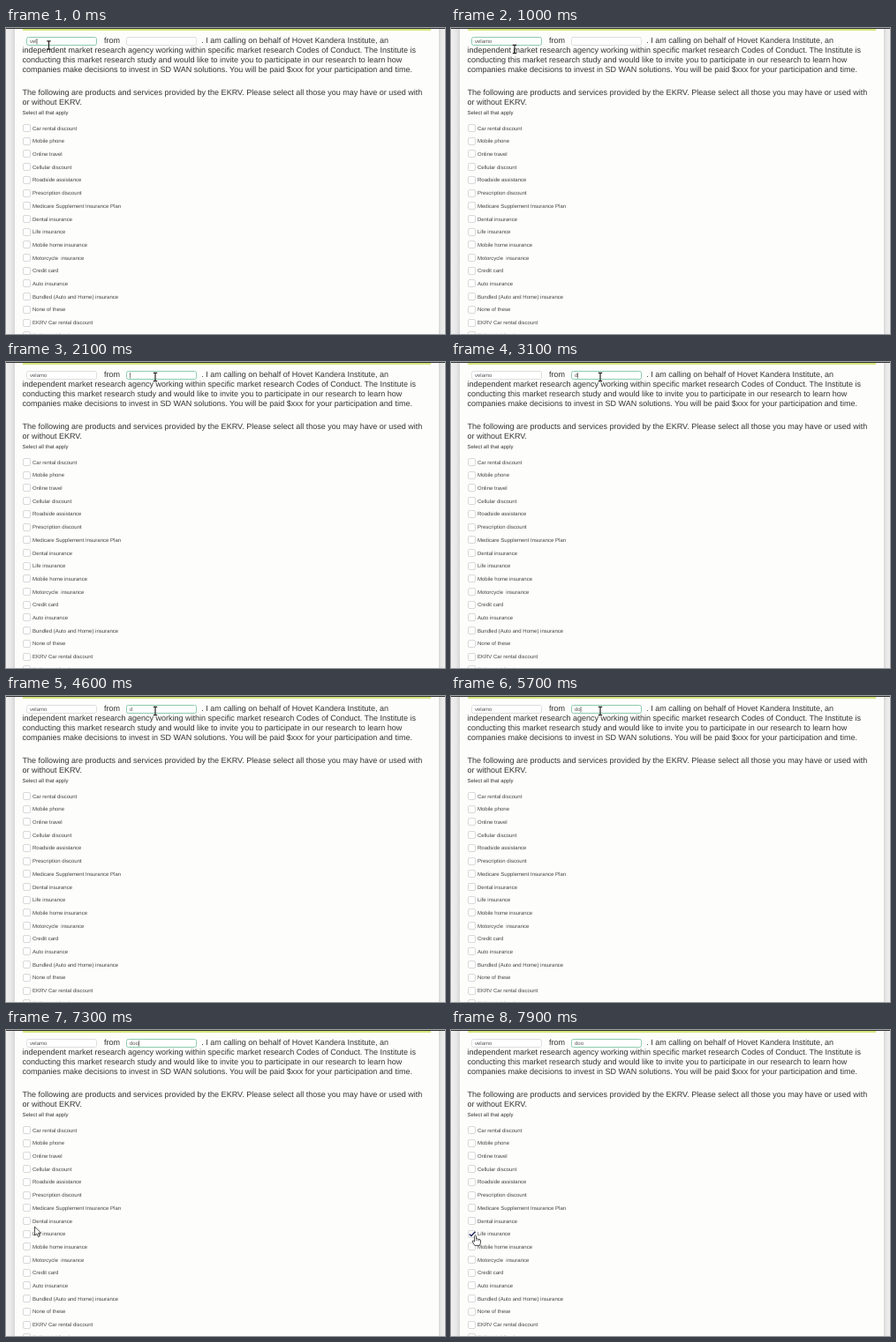
Animation, 497 px wide and 347 px high, one loop 8000 ms. Source, as an HTML page with a canvas:

```html
<!DOCTYPE html>
<html lang="en">
<head>
<meta charset="utf-8">
<title>Survey form</title>
<style>
  html, body { margin: 0; width: 100%; height: 100%; overflow: hidden; background: #fdfdfc; }
  canvas { display: block; }
</style>
</head>
<body>
<canvas id="stage" width="497" height="347"></canvas>
<script>
const ctx = document.getElementById('stage').getContext('2d');
const LOOP = 8000;
const FONT = '"Liberation Sans", Arial, sans-serif';
const ROW_TOP = 113.5, ROW_STEP = 14.7;
const PERSON = 'velamo', COMPANY = 'doo';
const CHECKED_ROW = 8;

const paragraphs = [
  [111, 17.2, 'from'],
  [221.3, 17.2, '. I am calling on behalf of Hovet Kandera Institute, an'],
  [18.5, 28.2, 'independent market research agency working within specific market research Codes of Conduct. The Institute is'],
  [18.5, 39.2, 'conducting this market research study and would like to invite you to participate in our research to learn how'],
  [18.5, 50.2, 'companies make decisions to invest in SD WAN solutions. You will be paid $xxx for your participation and time.'],
  [18.5, 76.2, 'The following are products and services provided by the EKRV. Please select all those you may have or used with'],
  [18.5, 87.2, 'or without EKRV.']
];

const options = [
  'Car rental discount', 'Mobile phone', 'Online travel', 'Cellular discount',
  'Roadside assistance', 'Prescription discount', 'Medicare Supplement Insurance Plan',
  'Dental insurance', 'Life insurance', 'Mobile home insurance', 'Motorcycle\u00a0 insurance',
  'Credit card', 'Auto insurance', 'Bundled (Auto and Home) insurance', 'None of these',
  'EKRV Car rental discount', 'EKRV Mobile phone'
];

// Each track is a list of [start time, value]; values hold until the next entry.
const tracks = {
  personLength: [[0, 3], [200, 4], [400, 5], [500, 6]],
  companyLength: [[0, 0], [3100, 1], [5700, 2], [6300, 3]],
  field: [[0, 0], [2100, 1]],
  caret: [[0, 1], [1000, 0], [1500, 1], [2600, 0], [3100, 1], [3700, 0], [4200, 1],
          [4600, 0], [5300, 1], [6800, 0], [7300, 1], [7900, 0]],
  spelling: [[0, 0], [1600, 1], [2100, 0]],
  checked: [[0, 0], [7500, 1]],
  pointer: [
    [0, ['beam', 48.5, 19.5]], [1000, ['beam', 72, 24]], [1100, ['beam', 99, 24]],
    [1500, ['beam', 146, 20]], [1600, ['beam', 168, 17]], [2100, ['beam', 169, 17]],
    [6800, ['arrow', 41.5, 217.5]], [7000, ['arrow', 38.5, 218.5]],
    [7300, ['arrow', 32.5, 223]], [7400, ['hand', 28, 228]], [7500, ['hand', 27, 228]],
    [7900, ['hand', 27.5, 233]]
  ]
};

function at(track, time) {
  let value;
  for (const [start, v] of track) if (time >= start) value = v;
  return value;
}

function text(str, x, y, size, color) {
  ctx.font = `${size}px ${FONT}`;
  ctx.fillStyle = color;
  ctx.fillText(str, x, y);
}

function roundBox(x, y, w, h, r, stroke) {
  ctx.beginPath();
  ctx.roundRect(x, y, w, h, r);
  ctx.fillStyle = '#fff';
  ctx.fill();
  ctx.strokeStyle = stroke;
  ctx.lineWidth = 1;
  ctx.stroke();
}

function edge(from, to) {
  const g = ctx.createLinearGradient(from, 0, to, 0);
  g.addColorStop(0, '#efefef');
  g.addColorStop(0.6, '#e8e8e8');
  g.addColorStop(1, '#d6d6d6');
  ctx.fillStyle = g;
  ctx.fillRect(Math.min(from, to), 0, Math.abs(to - from), 347);
}

function drawPage() {
  ctx.fillStyle = '#fdfdfc';
  ctx.fillRect(0, 0, 497, 347);
  edge(0, 10);
  edge(497, 490);
  ctx.fillStyle = '#d5e77b';
  ctx.fillRect(19, 1, 462, 2);
  ctx.fillStyle = '#333';
  ctx.fillRect(0, 0, 497, 1);
  for (const [x, y, str] of paragraphs) text(str, x, y, 9, '#333');
  text('Select all that apply', 18.5, 97.6, 6, '#333');
}

function drawOptions(checked) {
  options.forEach((label, i) => {
    const y = ROW_TOP + i * ROW_STEP;
    roundBox(19.5, Math.round(y - 4.5) + 0.5, 8, 8, 1.5, '#d9d9d9');
    text(label, 30, y + 2.1, 6, '#444');
  });
  if (!checked) return;
  const y = ROW_TOP + CHECKED_ROW * ROW_STEP;
  ctx.beginPath();
  ctx.moveTo(20.8, y + 0.3);
  ctx.lineTo(23, y + 2.4);
  ctx.lineTo(27.4, y - 2.3);
  ctx.strokeStyle = '#20265c';
  ctx.lineWidth = 1.4;
  ctx.stroke();
}

function drawField(x, value, active, caret, spelling) {
  roundBox(x + 0.5, 10.5, 79, 9, 2, active ? '#8ccbb0' : '#dedede');
  text(value, x + 4, 17.4, 6, '#555');
  const width = ctx.measureText(value).width;
  if (spelling) {
    ctx.fillStyle = '#9aa9ad';
    ctx.fillRect(x + 4, 18, width, 0.8);
  }
  if (active && caret) {
    ctx.fillStyle = '#444';
    ctx.fillRect(x + 4 + width, 12, 0.7, 6.5);
  }
}

function outlined(path) {
  ctx.fillStyle = '#fff';
  ctx.strokeStyle = '#222';
  ctx.lineWidth = 0.8;
  ctx.lineJoin = 'round';
  ctx.fill(path);
  ctx.stroke(path);
}

const arrowPath = new Path2D('M0 0V10L2.3 7.9L4 11.5L5.7 10.7L4.1 7.2H7.2Z');
const handPath = new Path2D('M-1 .7Q0-.6 1 .7V4Q2 3.2 2.8 4.3Q3.8 3.6 4.5 4.7Q5.8 4.2 6 5.6V8.5L5 11.4H-.7L-3.3 7.1Q-3.5 5.6-2.2 6L-1 7.1Z');

const pointers = {
  beam() {
    ctx.strokeStyle = '#222';
    ctx.lineWidth = 1.2;
    ctx.beginPath();
    ctx.moveTo(-2.2, -4.7);
    ctx.lineTo(2.2, -4.7);
    ctx.moveTo(0, -4.7);
    ctx.lineTo(0, 4.7);
    ctx.moveTo(-2.2, 4.7);
    ctx.lineTo(2.2, 4.7);
    ctx.stroke();
  },
  arrow() { outlined(arrowPath); },
  hand() {
    outlined(handPath);
    ctx.beginPath();
    for (const x of [1, 2.8, 4.5]) {
      ctx.moveTo(x, 4.3);
      ctx.lineTo(x, 6.3);
    }
    ctx.lineWidth = 0.5;
    ctx.stroke();
  }
};

function draw(time) {
  const now = name => at(tracks[name], time);
  ctx.textRendering = 'geometricPrecision';
  drawPage();
  drawOptions(now('checked'));
  const field = now('field');
  drawField(23, PERSON.slice(0, now('personLength')), field === 0, now('caret'), now('spelling'));
  drawField(136, COMPANY.slice(0, now('companyLength')), field === 1, now('caret'), 0);
  const [kind, x, y] = now('pointer');
  ctx.save();
  ctx.translate(x, y);
  pointers[kind]();
  ctx.restore();
}

const start = performance.now();
function frame() {
  draw((performance.now() - start) % LOOP);
  requestAnimationFrame(frame);
}
frame();
</script>
</body>
</html>
```
